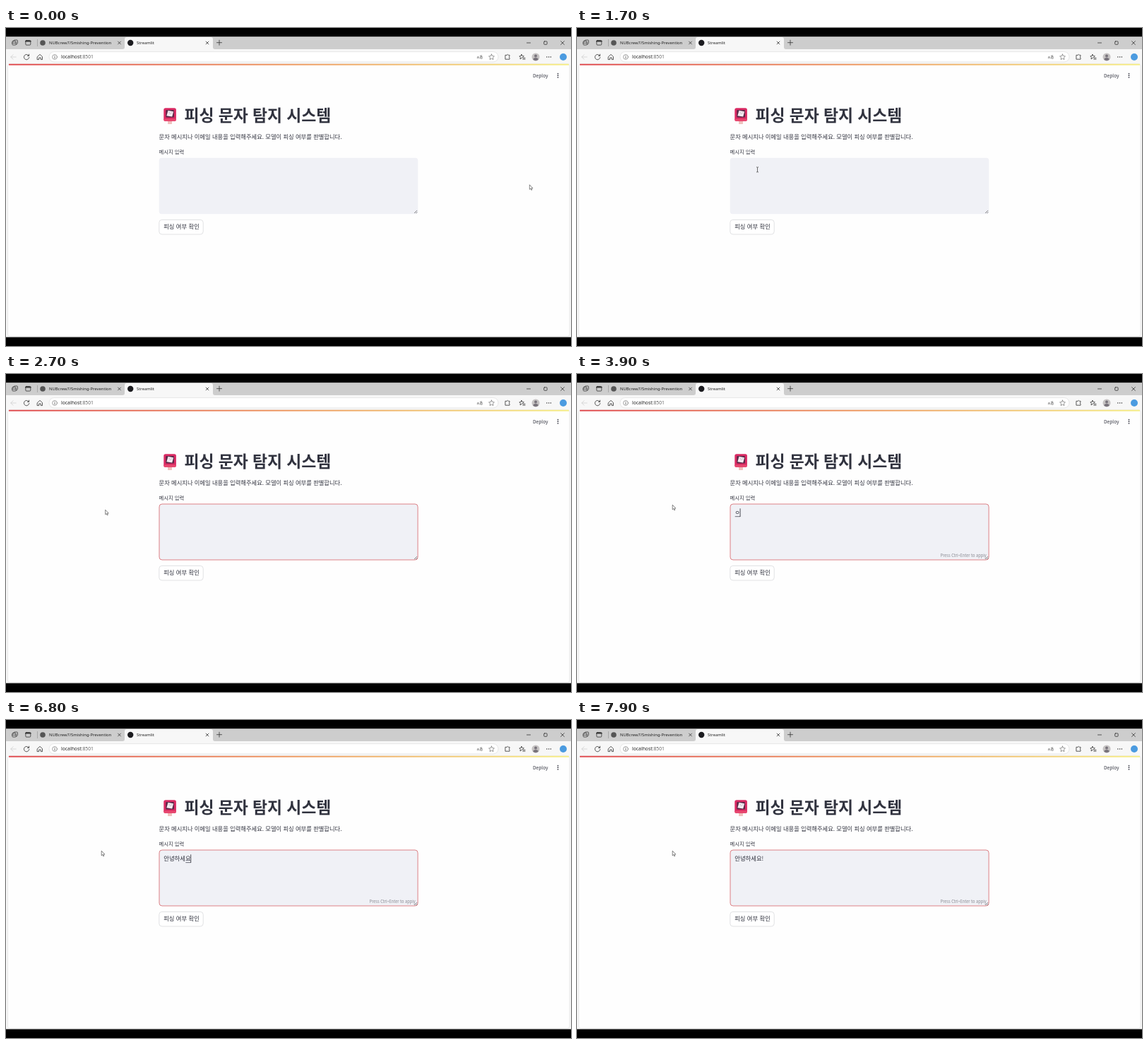
Animation, 800 px wide and 450 px high, one loop 8 s. Source, as an HTML page:

```html
<!DOCTYPE html>
<html lang="ko">
<head>
<meta charset="utf-8">
<title>피싱 문자 탐지 시스템</title>
<style>
html, body { margin: 0; width: 100%; height: 100%; overflow: hidden; background: #000; }
svg { display: block; width: 800px; height: 450px; }
text { font-family: "Noto Sans CJK KR", "Noto Sans KR", sans-serif; fill: #31333f; white-space: pre; }
.ui { font-family: "Noto Sans", "Open Sans", sans-serif; fill: #222; }
.ico { fill: none; stroke: #333; stroke-width: .8; stroke-linecap: round; stroke-linejoin: round; }
</style>
</head>
<body>
<svg viewBox="0 0 800 450" xmlns="http://www.w3.org/2000/svg">
  <defs>
    <linearGradient id="bar">
      <stop offset="0" stop-color="#e04a4f"/>
      <stop offset=".5" stop-color="#ef9a62"/>
      <stop offset="1" stop-color="#f6ee86"/>
    </linearGradient>
  </defs>
  <rect width="800" height="450" fill="#000"/>

  <!-- window frame and tabs -->
  <rect y="12.5" width="800" height="425" fill="#f7f7f7"/>
  <rect y="12.5" width="800" height="17.5" fill="#cdcdcd"/>
  <path d="M165 30Q168 30 168 27V16Q168 13 171 13H290Q293 13 293 16V27Q293 30 296 30Z" fill="#f7f7f7"/>
  <path d="M44.5 16V26" stroke="#999" stroke-width=".7"/>
  <g class="ico">
    <rect x="8.8" y="18.6" width="5.4" height="5.4" rx="1.2"/>
    <path d="M10.5 18.4L11.6 17H15.4Q16.4 17 16.4 18V21.6L14.6 23.6M8.8 21.2H14"/>
    <rect x="27.8" y="17.5" width="7" height="6.6" rx="1.2"/>
    <path d="M27.9 18.7H34.7" stroke-width="1.8"/>
    <path d="M158.6 19.1L162.4 22.9M162.4 19.1L158.6 22.9M283.1 19.1L286.9 22.9M286.9 19.1L283.1 22.9"/>
    <path d="M298.5 20.7H305.5M302 17.2V24.2"/>
    <path d="M737.5 21H742.5M785.6 18.7L790.4 23.5M790.4 18.7L785.6 23.5"/>
    <rect x="761.7" y="18.9" width="4.4" height="4.4" rx=".8"/>
  </g>
  <circle cx="52" cy="21" r="3.8" fill="#555"/>
  <circle cx="176.2" cy="21" r="4.2" fill="#1c1c20"/>
  <text class="ui" x="61" y="23.2" font-size="5.89">NUBcrew7/Smishing-Prevention</text>
  <text class="ui" x="185" y="23.2" font-size="5.87">Streamlit</text>

  <!-- toolbar -->
  <rect x="61" y="33.6" width="636" height="14.4" rx="7.2" fill="#fff" stroke="#d8d8d8" stroke-width=".6"/>
  <g class="ico">
    <path d="M14.2 41H6.8M10 37.8L6.8 41L10 44.2" stroke="#cfcfcf"/>
    <path d="M32.3 39.2A3.7 3.7 0 1 0 32.8 41.6M32.6 37.2V39.4H30.4"/>
    <path d="M44.5 40.6L48 37.4L51.5 40.6V44.6H49.3V42H46.7V44.6H44.5Z"/>
    <circle cx="69" cy="41" r="3.4" stroke="#666" stroke-width=".6"/>
    <path d="M69 40.6V42.8M69 39.1V39.2" stroke="#555"/>
    <path id="star" d="M687.5 37.1L688.7 39.6L691.4 40L689.4 41.9L689.9 44.6L687.5 43.3L685.1 44.6L685.6 41.9L683.6 40L686.3 39.6Z" stroke="#555" stroke-width=".6"/>
    <path d="M707.3 38.4H709.2Q710.3 36.4 711.4 38.4H713V40.2Q711 41.1 713 42.1V44.2H707.3Z"/>
    <path d="M730 37.4L731 39.5L733.4 39.9L731.7 41.5L730.2 42.3L728 44L728.4 41.6L726.8 39.9L729 39.5ZM732.2 42.4H735M731.8 44.2H735"/>
  </g>
  <text class="ui" x="666.5" y="43" font-size="6" style="fill:#555">a<tspan style="font-family:'Noto Sans CJK JP','Noto Sans CJK KR',sans-serif" font-size="5.4">あ</tspan></text>
  <text class="ui" x="78" y="43.3" font-size="6.78">localhost<tspan fill="#666">:8501</tspan></text>
  <circle cx="750" cy="41" r="5.5" fill="#c6c3c3"/>
  <circle cx="750" cy="39.4" r="2" fill="#77727a"/>
  <path d="M746.3 44.7Q746.6 42 750 42T753.7 44.7Q750 47.6 746.3 44.7Z" fill="#77727a"/>
  <g fill="#333"><circle cx="765.8" cy="41" r=".75"/><circle cx="768.6" cy="41" r=".75"/><circle cx="771.4" cy="41" r=".75"/></g>
  <circle cx="789" cy="41" r="5" fill="#4b9be0"/>

  <!-- page -->
  <rect x="2.5" y="50.8" width="795.5" height="385.5" rx="3" fill="#fefefe" stroke="#dedede" stroke-width=".6"/>
  <rect x="4" y="50.8" width="793" height="1.9" fill="url(#bar)"/>
  <text x="746" y="69.8" font-size="6.6">Deploy</text>
  <g fill="#31333f"><circle cx="781.5" cy="64.6" r=".85"/><circle cx="781.5" cy="67.2" r=".85"/><circle cx="781.5" cy="69.8" r=".85"/></g>

  <!-- postbox -->
  <rect x="229" y="129" width="6" height="7" rx=".8" fill="#efc0bd"/>
  <rect x="223.3" y="113.2" width="17.6" height="18.6" rx="2.6" fill="#d92a63"/>
  <path d="M223.3 128.6H240.9V129.2Q240.9 131.8 238.3 131.8H225.9Q223.3 131.8 223.3 129.2Z" fill="#e8486f"/>
  <rect x="226.3" y="116" width="11.6" height="10.4" rx="1" fill="#5a2747"/>
  <path d="M229.4 116.8L237.2 118.2L235.2 125.6L227.4 124.2Z" fill="#f3eaf0"/>
  <path d="M229.4 116.8L232.4 121.4L237.2 118.2" fill="none" stroke="#b9a9ba" stroke-width=".6"/>

  <text x="252.6" y="132.4" font-size="22.9" font-weight="700" letter-spacing="-.1">피싱 문자 탐지 시스템</text>
  <text x="216.6" y="156.6" font-size="8.27">문자 메시지나 이메일 내용을 입력해주세요. 모델이 피싱 여부를 판별합니다.</text>
  <text x="216.6" y="177.8" font-size="7.29">메시지 입력</text>
  <rect x="216.7" y="183.8" width="366.6" height="79.4" rx="4" fill="#f0f1f6"/>
  <rect id="focus" x="217" y="184" width="366.1" height="79" rx="4" fill="none" stroke="#d9666b" stroke-width=".8"/>
  <path d="M578.2 262L582 258.2M580.6 262.2L582.2 260.6" stroke="#444" stroke-width=".7"/>
  <text id="hint" x="514.6" y="259" font-size="5.6" style="fill:#85868e">Press Ctrl+Enter to apply</text>
  <text id="msg" x="223.3" y="198.9" font-size="8.33"></text>
  <path id="under" stroke="#31333f" stroke-width=".7"/>
  <path id="caret" stroke="#22232b" stroke-width=".8"/>
  <rect x="216.8" y="271.4" width="62.4" height="20.6" rx="4" fill="#fff" stroke="#d5d6d9" stroke-width=".7"/>
  <text x="223.2" y="284.2" font-size="8.33">피싱 여부 확인</text>

  <path id="arrow" d="M0 0V6.6L1.5 5.3L2.5 7.6L3.6 7.1L2.6 4.9H4.6Z" fill="#fff" stroke="#333" stroke-width=".6" stroke-linejoin="round"/>
  <path id="beam" d="M-1.5 -3.5H-.4L0 -3.1L.4 -3.5H1.5M0 -3.1V3.1M-1.5 3.5H-.4L0 3.1L.4 3.5H1.5" fill="none" stroke="#333" stroke-width=".7"/>
</svg>
<script>
const LOOP = 8000, STEP = 100, LEFT = 223.4, ADV = 7.66;
const $ = id => document.getElementById(id);
const [focus, hint, msg, under, caret, arrow, beam] =
  ['focus', 'hint', 'msg', 'under', 'caret', 'arrow', 'beam'].map($);

// Pointer stops: time, x, y
const path = [
  [0, 741.3, 221.8], [900, 741.3, 221.8], [1700, 255.5, 200.4], [1800, 275.5, 207],
  [2300, 275.5, 207], [2700, 140.7, 192.2], [3100, 140.7, 192.2], [3400, 135.2, 185.2], [LOOP, 135.2, 185.2]
];
// Input method states: time, text
const typing = [
  [0, ''], [3900, 'ㅇ'], [4300, '아'], [4500, '안'], [4700, '안ㄴ'], [4900, '안녀'], [5000, '안녕'],
  [5300, '안녕ㅎ'], [5500, '안녕하'], [5700, '안녕하ㅅ'], [5900, '안녕하서'], [6000, '안녕하세'],
  [6300, '안녕하세ㅇ'], [6500, '안녕하세요'], [7400, '안녕하세요!']
];

const show = (el, on) => el.setAttribute('visibility', on ? 'visible' : 'hidden');
const last = (list, t) => list.filter(k => k[0] <= t).pop();

function pointer(t) {
  const i = path.findIndex(k => k[0] > t);
  const [t0, x0, y0] = path[i - 1], [t1, x1, y1] = path[i];
  const p = (t - t0) / (t1 - t0), e = p * p * (3 - 2 * p);
  return [x0 + (x1 - x0) * e, y0 + (y1 - y0) * e];
}

function caretOn(t) {
  if (t < 1900) return false;
  if (t < 3900) return Math.floor((t - 1900) / 500) % 2 === 0;
  return t < 7900;
}

function draw(time) {
  const t = Math.floor(time / STEP) * STEP;
  const [x, y] = pointer(t);
  const inside = x > 217 && x < 583 && y > 184 && y < 263;
  for (const el of [arrow, beam]) el.setAttribute('transform', `translate(${x} ${y})`);
  show(arrow, !inside);
  show(beam, inside);

  focus.setAttribute('opacity', Math.max(0, Math.min(1, (t - 1800) / 300)));
  show(hint, t >= 3900);

  const text = last(typing, t)[1], done = text.endsWith('!');
  if (msg.textContent !== text) msg.textContent = text;
  const end = LEFT + (done ? 5 * ADV + 2.8 : text.length * ADV);
  under.setAttribute('d', `M${end - ADV + .3} 201.7H${end}`);
  show(under, text && !done);
  caret.setAttribute('d', `M${end} 190.3V202`);
  show(caret, caretOn(t));
}

function tick(now) {
  draw(now % LOOP);
  requestAnimationFrame(tick);
}
draw(0);
requestAnimationFrame(tick);
</script>
</body>
</html>
```
